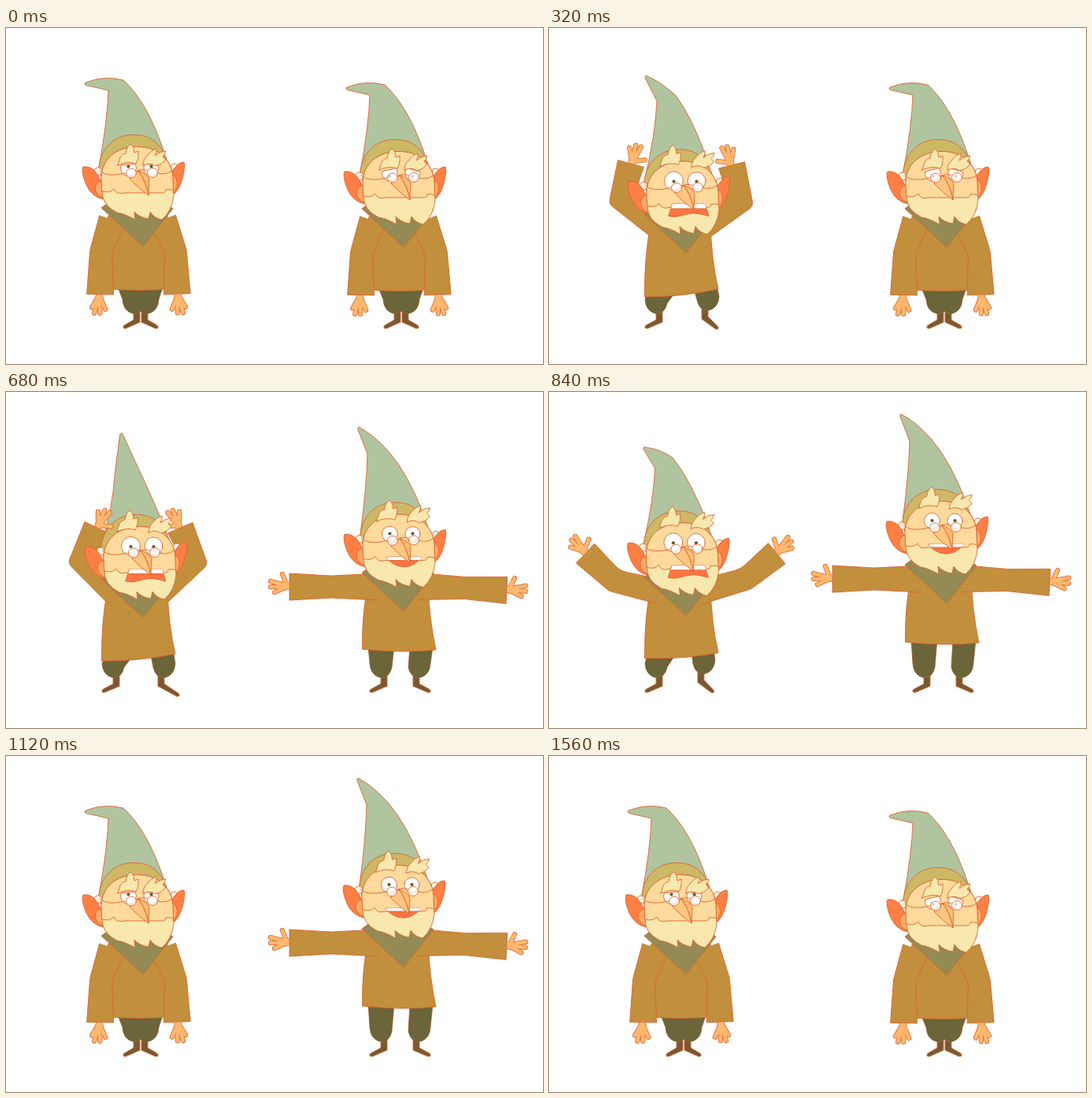
These frames come from a looping animation (682 px wide and 426 px high, 1.6 s). An HTML page with a canvas:

```html
<!DOCTYPE html>
<html lang="en">
<head>
<meta charset="utf-8">
<title>Two gnomes</title>
<style>
html, body { margin: 0; width: 100%; height: 100%; overflow: hidden; background: #fff; }
canvas { display: block; width: 682px; height: 426px; }
</style>
</head>
<body>
<canvas id="stage"></canvas>
<script>
const LOOP = 1600, STEP = 40;
const canvas = document.getElementById('stage');
const ctx = canvas.getContext('2d');
const dpr = window.devicePixelRatio || 1;
canvas.width = 682 * dpr;
canvas.height = 426 * dpr;

const C = {
  line: '#dc6430', hat: '#b0c4a0', hood: '#cdb866', skin: '#ffda9c', beard: '#f8e8ae',
  nose: '#ffc680', ear: '#ff7f45', earFold: '#ffab66', coat: '#c28f3c', collar: '#948a54',
  pants: '#6b653a', shoe: '#755a33', hand: '#ffb86e', mouth: '#ff7443', pupil: '#6a5a2c'
};

// Fixed head parts, in the coordinates of the resting left gnome
const P = {
  hood: new Path2D('M122 192 L118 176 C121 150 140 135 162 135.500 C184 135 199 148 205 170 L211 190 Z'),
  face: new Path2D('M121 190 C121 166 141 150.500 167 150.500 C192 150.500 211 166 212 190 L213 212 Q211 232 198 243 Q188 241 183 233 L181 242 Q169 240 163 233 L164 243 Q150 235 141 234 Q121 224 122 206 Z'),
  skin: new Path2D('M121 190 C121 166 141 150.500 167 150.500 C192 150.500 211 166 212 190 L212.500 206 Q208 204 203 205 Q203 209 198 209 L150 209 Q140 212 137 204 Q132 210 122 207 Z'),
  earL: new Path2D('M123 217 Q109 214 102 199 Q95 182 98 176 Q109 174 117 187 Q122 195 123 205 Z'),
  foldL: new Path2D('M122 193 Q111 196 114 207 Q117 214 123 215 Z'),
  earR: new Path2D('M211 212 Q220 207 224 191 Q228 176 226 170 Q216 170 211 185 Z'),
  foldR: new Path2D('M212 186 Q219 191 217 201 Q215 208 211 210 Z'),
  noseL: new Path2D('M168 181 Q160 185 157 191 Q168 203 181 212 Q178 194 168 181 Z'),
  noseR: new Path2D('M168 181 Q178 184 182 191 L181 212 Q178 194 168 181 Z'),
  frame: new Path2D('M119 181 Q128 190 152 184 M165.500 182 Q173 178 179.500 181 M192 184 Q206 188 215 177'),
  browL: new Path2D('M-13 10 L-10 0 Q-7 -5 -3 -5 Q-1 -16 4 -17 Q8 -13 8 -6 L13 -8 Q14 2 10 8 Q0 4 -13 10 Z'),
  browR: new Path2D('M-14 9 Q-14 2 -9 -3 Q-4 -10 3 -12 Q4 -8 1 -3 Q8 -9 15 -9 Q14 -4 11 -2 L15 2 Q10 8 2 10 Q-5 5 -14 9 Z'),
  collar: new Path2D('M121 228 L174 277 L212 229 L198 220 L132 220 Z')
};

// legs: outer hip, inner hip, ankle, toe for each side
const legs = {
  rest: [141, 172, 166, 361, 149, 379, 200, 170, 176, 361, 193, 379],
  wide: [124, 159, 140, 361, 122, 379, 213, 183, 198, 357, 215, 380],
  kick: [125, 159, 140, 361, 122, 379, 212, 183, 197, 361, 220, 384],
  skew: [125, 161, 140, 361, 122, 379, 207, 179, 190, 353, 202, 376],
  hang: [139, 172, 163, 333, 156, 363, 204, 174, 181, 333, 188, 361],
  open: [129, 162, 149, 361, 131, 379, 211, 182, 190, 361, 208, 379]
};
// hat: tip, crook, shoulder
const droop = [100, 70, 130, 79, 149, 66];
const perked = [116, 40, 127, 74, 154, 71];

// body: shift, left and right hem; arms: upper and lower angle, left then right;
// eyes: radius, opening, tilt, pupil y; mouth: opening, smile
const rest = {
  head: [0, 0], body: [0, 330, 330], hat: droop, arms: [19, 1, 21, 2],
  legs: legs.rest, eyes: [10, .45, .1, 175.5], brow: [0], mouth: [0, 0]
};
const pose = (base, change) => ({ ...base, ...change });
const scared = pose(rest, {
  head: [3, 18.5], body: [8, 341, 331], hat: [120, 42, 134, 74, 158, 67], arms: [129, 195, 126, 194],
  legs: legs.wide, eyes: [12, 1, 0, 176], brow: [1], mouth: [1, 0]
});
const clutch = pose(scared, {
  head: [3, 20], body: [9, 341, 332], hat: [144, 32, 135, 85, 162, 70],
  arms: [136, 205, 134, 203], legs: legs.kick
});
const shrug = pose(scared, {
  head: [2, 12], body: [5, 335, 330], hat: droop, arms: [80, 82, 86, 77], legs: legs.skew
});
const glum = pose(rest, { head: [1, 6], body: [1, 331, 331], eyes: [10, .4, .25, 182] });
const jump = pose(glum, {
  head: [0, -27], body: [-34, 291, 292], arms: [45, -2, 46, 3], legs: legs.hang,
  eyes: [10, .55, .2, 176], brow: [.1], mouth: [.4, .5]
});
const cheer = pose(glum, {
  head: [0, -12], body: [-9, 317, 318], hat: perked, arms: [90, 90, 88, 87], legs: legs.open,
  eyes: [10, 1, 0, 175], brow: [.85], mouth: [1, 1]
});
const land = pose(cheer, { head: [1, 4.5], body: [1, 326, 327] });

const tracks = [
  { x: 0, keys: [[0, rest], [320, scared], [440, clutch], [740, clutch], [920, shrug], [970, shrug], [1120, rest], [LOOP, rest]] },
  { x: 331, keys: [[0, glum], [360, glum], [520, jump], [680, land], [800, cheer], [1180, cheer], [1420, glum], [LOOP, glum]] }
];

const mix = (a, b, k) => a + (b - a) * k;
const clamp = v => Math.max(0, Math.min(1, v));

function poseAt(keys, t) {
  const i = keys.findIndex((key, n) => t < keys[n + 1][0]);
  const [t0, a] = keys[i], [t1, b] = keys[i + 1];
  const u = (t - t0) / (t1 - t0), k = u * u * (3 - 2 * u);
  const out = {};
  for (const part in a) out[part] = a[part].map((v, n) => mix(v, b[part][n], k));
  return out;
}

function paint(fill, path) {
  ctx.fillStyle = fill;
  path ? ctx.fill(path) : ctx.fill();
  path ? ctx.stroke(path) : ctx.stroke();
}

function shifted(x, y, draw) {
  ctx.save();
  ctx.translate(x, y);
  draw();
  ctx.restore();
}

function ellipse(x, y, rx, ry, fill) {
  ctx.beginPath();
  ctx.ellipse(x, y, rx, ry, 0, 0, 2 * Math.PI);
  paint(fill);
}

function drawLegs(v, hems) {
  const sides = [-1, 1].map((s, i) => {
    const [outer, inner, ax, ay, tx, ty] = v.slice(i * 6, i * 6 + 6);
    ctx.beginPath();
    ctx.moveTo(ax + 4 * s, ay - 2);
    ctx.lineTo(ax + 4 * s, ay + 9);
    ctx.lineTo(tx - s, ty - 2);
    ctx.quadraticCurveTo(tx + 2 * s, ty + 2, tx - 3 * s, ty + 2);
    ctx.lineTo(ax - 4 * s, ay + 12);
    ctx.lineTo(ax - 4 * s, ay - 2);
    paint(C.shoe);
    const p = new Path2D(), top = hems[i] - 4;
    p.moveTo(outer, top);
    p.lineTo(ax + 18 * s, ay - 17);
    p.quadraticCurveTo(ax + 17 * s, ay - 2, ax + 5 * s, ay + 1);
    p.quadraticCurveTo(ax - 7 * s, ay + 2, ax - 10 * s, ay - 12);
    p.lineTo(inner, top);
    p.closePath();
    return p;
  });
  ctx.fillStyle = C.pants;
  sides.forEach(p => ctx.stroke(p));
  sides.forEach(p => ctx.fill(p));
}

// Angles run from hanging (0) outwards to raised (180)
function armOf(s, upper, lower, by) {
  const rad = Math.PI / 180, a = upper * rad, b = lower * rad, m = (a + b) / 2;
  const along = (p, ang, d) => [p[0] + s * Math.sin(ang) * d, p[1] + Math.cos(ang) * d];
  const across = (p, ang, d) => [p[0] + s * Math.cos(ang) * d, p[1] - Math.sin(ang) * d];
  const inset = 13 * Math.max(0, 1 - upper / 60);
  const raise = clamp((upper - 90) / 40);
  const root = [167 + s * (41 - inset), 246 + by - inset / 3 - 9 * raise];
  const elbow = along(root, a, 44), cuff = along(elbow, b, 53 - 6 * raise);
  const tuck = along(root, a, -16 * clamp((upper - 20) / 60));
  return { a, b, m, raise, along, across, tuck, elbow, cuff, bend: 14 / Math.cos((b - a) / 2) };
}

function drawSleeve({ a, b, m, raise, across, tuck, elbow, cuff, bend }) {
  const w = 17 - 4 * raise;
  const outA = across(tuck, a, w), inA = across(tuck, a, -w);
  const outB = across(elbow, m, bend), inB = across(elbow, m, -bend);
  const outC = across(cuff, b, 17), inC = across(cuff, b, -17);
  ctx.beginPath();
  ctx.moveTo(...outA);
  ctx.arcTo(...outB, ...outC, 30);
  ctx.lineTo(...outC);
  ctx.lineTo(...inC);
  ctx.arcTo(...inB, ...inA, 10);
  ctx.lineTo(...inA);
  paint(C.coat);
}

function drawHand({ b, along, across, cuff }) {
  const splay = clamp(b / 1.57);
  const at = (d, n) => across(along(cuff, b, d), b, n);
  const fingers = [
    [4, 3, mix(17, 9, splay), mix(10, 16, splay)],
    [8, 3, 24, 7], [9, 0, 24, 0], [8, -2, 19, -7]
  ];
  [[C.line, 1.6], [C.hand, 0]].forEach(([color, grow]) => {
    ctx.strokeStyle = color;
    const stroke = (from, to, w) => {
      ctx.lineWidth = w + grow;
      ctx.beginPath();
      ctx.moveTo(...from);
      ctx.lineTo(...to);
      ctx.stroke();
    };
    ctx.lineCap = 'butt';
    stroke(at(.5, 1), at(6, 1), 8);
    ctx.lineCap = 'round';
    stroke(at(6, 1), at(9, 1), 9);
    fingers.forEach(f => stroke(at(f[0], f[1]), at(f[2], f[3]), 4.6));
  });
  ctx.lineWidth = .9;
  ctx.strokeStyle = C.line;
}

function drawTorso([by, left, right]) {
  ctx.beginPath();
  ctx.moveTo(130, 238 + by);
  ctx.quadraticCurveTo(121, 275 + by, 121.5, left);
  ctx.quadraticCurveTo(170, (left + right) / 2 + 5, 215, right);
  ctx.quadraticCurveTo(206, 285 + by, 205, 238 + by);
  ctx.closePath();
  paint(C.coat);
}

function drawHat([tx, ty, cx, cy, sx, sy]) {
  const ang = Math.atan2(ty - cy, tx - cx);
  const ux = 2 * Math.cos(ang), uy = 2 * Math.sin(ang);
  const bulge = clamp((148 - tx) / 48);
  ctx.beginPath();
  ctx.moveTo(118, 176);
  ctx.quadraticCurveTo(mix(118, cx, .9), mix(176, cy, .6), cx, cy);
  ctx.lineTo(tx - ux + uy, ty - uy - ux);
  ctx.quadraticCurveTo(tx + ux, ty + uy, tx - ux - uy, ty - uy + ux);
  ctx.quadraticCurveTo((tx + sx) / 2, (ty + sy) / 2 - 8 * bulge, sx, sy);
  ctx.quadraticCurveTo(mix(sx, 200, .4) + 10 * bulge, mix(sy, 155, .4) - 8 * bulge, 200, 155);
  ctx.lineTo(202, 165);
  ctx.closePath();
  paint(C.hat);
}

function drawEye(x, y, [r, opening, tilt, py], side) {
  const cut = Math.asin(clamp(opening)), turn = tilt * side;
  ctx.beginPath();
  ctx.arc(x, y, r, turn - cut, Math.PI + turn + cut);
  ctx.closePath();
  paint('#fff');
  ctx.fillStyle = C.pupil;
  ctx.beginPath();
  ctx.arc(x, py, 2.1, 0, 2 * Math.PI);
  ctx.fill();
}

function drawMouth([open, smile]) {
  if (open < .03) return;
  const wave = [[149, 220], [157, 222], [172, 217], [186, 216], [200, 220]];
  const grin = [[151, 206], [159, 214], [173, 218], [186, 215], [196, 206]];
  const lip = wave.map((p, i) => [mix(p[0], grin[i][0], smile), mix(208, mix(p[1], grin[i][1], smile), open)]);
  const top = mix(208, 204.5, open);
  ctx.beginPath();
  ctx.moveTo(154, top);
  ctx.lineTo(195, top);
  ctx.lineTo(...lip[4]);
  for (let i = 3; i > 0; i--) {
    const p = lip[i], q = lip[i - 1], last = i === 1;
    ctx.quadraticCurveTo(...p, last ? q[0] : (p[0] + q[0]) / 2, last ? q[1] : (p[1] + q[1]) / 2);
  }
  ctx.closePath();
  paint(C.mouth);
  ctx.save();
  ctx.clip();
  ctx.beginPath();
  ctx.rect(145, 200, 60, 10.5 - smile * 1.5);
  paint('#fff');
  ctx.restore();
}

function drawFace({ eyes, brow: [lift], mouth }) {
  ellipse(117, 182, 5, 5, '#fff4e0');
  ellipse(214, 177, 5, 5, '#fff4e0');
  paint(C.ear, P.earL);
  paint(C.earFold, P.foldL);
  paint(C.ear, P.earR);
  paint(C.earFold, P.foldR);
  paint(C.beard, P.face);
  paint(C.skin, P.skin);
  drawMouth(mouth);
  const ey = mix(178, 175.5, clamp((eyes[1] - .4) / .6));
  drawEye(155.5, ey, eyes, -1);
  drawEye(184.5, ey, [eyes[0] * .95, ...eyes.slice(1)], 1);
  paint(C.nose, P.noseL);
  paint('#fbbd76', P.noseR);
  ctx.stroke(P.frame);
  ellipse(159, 184, 6.5, 6, 'rgba(255,255,255,.72)');
  ellipse(186, 183.5, 6.5, 6, 'rgba(255,255,255,.72)');
  shifted(155 - 4 * lift, 164 - 17 * lift, () => paint(C.beard, P.browL));
  shifted(188 + 4 * lift, 165 - 16 * lift, () => paint(C.beard, P.browR));
}

function drawGnome(g) {
  const [hx, hy] = g.head, by = g.body[0], a = g.arms;
  const arms = [armOf(-1, a[0], a[1], by), armOf(1, a[2], a[3], by)];
  drawLegs(g.legs, g.body.slice(1));
  drawTorso(g.body);
  arms.forEach(drawSleeve);
  shifted(0, by, () => paint(C.collar, P.collar));
  shifted(hx, hy, () => {
    drawHat(g.hat);
    paint(C.hood, P.hood);
  });
  arms.forEach(drawHand);
  shifted(hx, hy, () => drawFace(g));
}

function render(now) {
  const t = Math.floor((now % LOOP) / STEP) * STEP;
  ctx.setTransform(dpr, 0, 0, dpr, 0, 0);
  ctx.fillStyle = '#fff';
  ctx.fillRect(0, 0, 682, 426);
  ctx.lineWidth = .9;
  ctx.lineJoin = 'round';
  ctx.strokeStyle = C.line;
  for (const { x, keys } of tracks) shifted(x, 0, () => drawGnome(poseAt(keys, t)));
}

const start = performance.now();
function tick() {
  render(performance.now() - start);
  requestAnimationFrame(tick);
}
tick();
</script>
</body>
</html>
```
